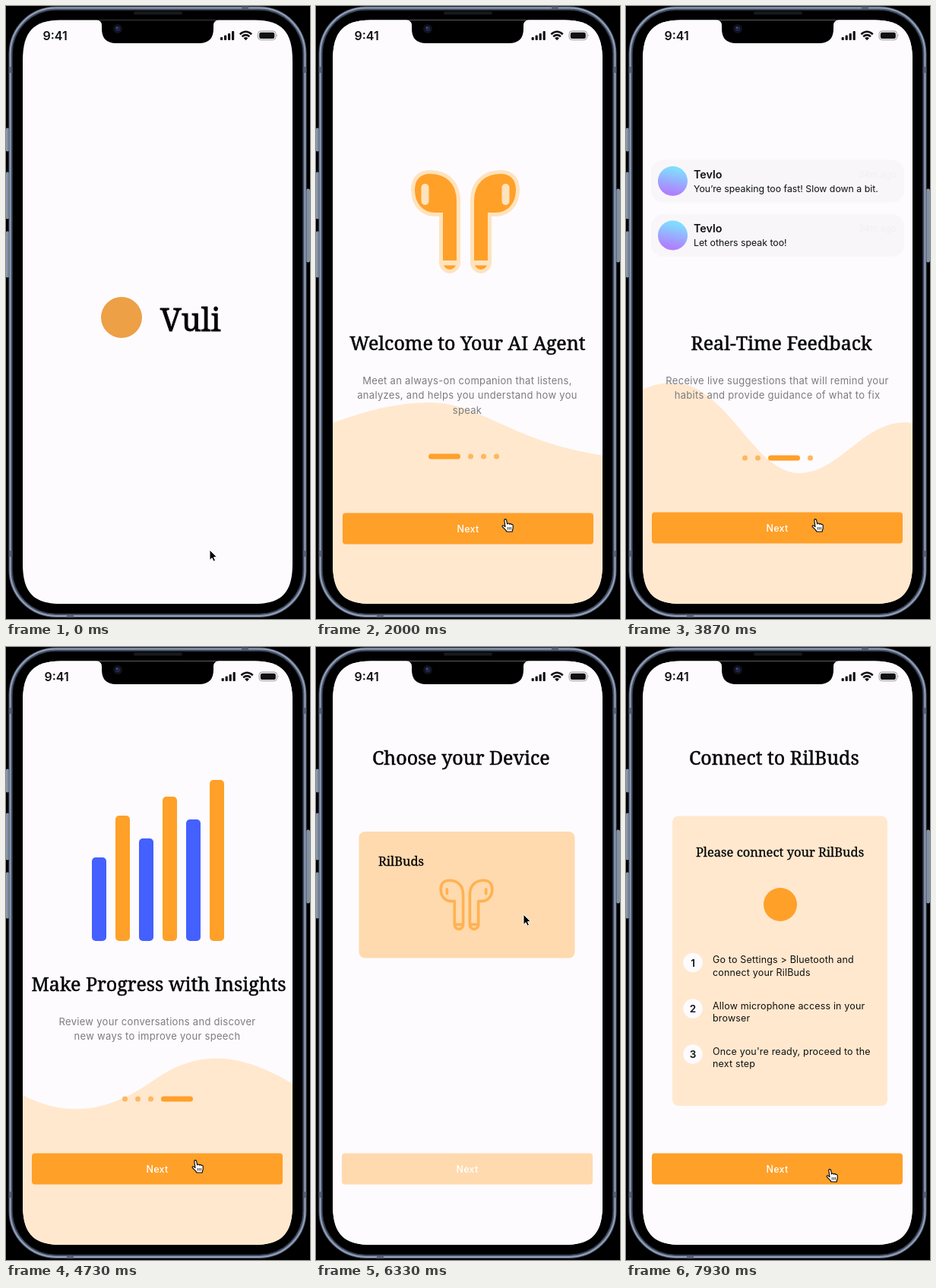
These frames come from a looping animation (400 by 807 pixels, 8 s). An HTML page:

```html
<!DOCTYPE html>
<html lang="en">
<head>
<meta charset="utf-8">
<title>Onboarding</title>
<style>
  html, body { margin: 0; width: 100%; height: 100%; overflow: hidden; background: #000; }
  svg { display: block; width: 100vw; height: 100vh; }
  text { font-family: Inter, sans-serif; fill: #111; }
  .serif { font-family: "Noto Serif", serif; fill: #050505; stroke: #050505; stroke-width: .02em; }
  .title { font-size: 25px; }
  .label { font-size: 16.5px; }
  .copy { font-size: 13px; letter-spacing: .3px; fill: #7d7b80; }
  .next { font-size: 12.5px; font-weight: 500; letter-spacing: .3px; fill: #fff; }
  .time { font-size: 16px; font-weight: 600; }
  .name { font-size: 14.3px; font-weight: 600; }
  .note { font-size: 12.3px; }
  .ago { font-size: 12px; fill: #f1eff2; }
  .step { font-size: 12.5px; letter-spacing: .17px; }
  .number { font-size: 13.5px; font-weight: 600; }
  .mid { text-anchor: middle; }
  .end { text-anchor: end; }
</style>
</head>
<body>
<svg id="stage" viewBox="0 0 400 807" preserveAspectRatio="none"></svg>
<script>
const LOOP = 8000, FADE = 300;
const ORANGE = '#ffa029', PALE = '#ffe8ce', PAPER = '#fdfbfe', BLUE = '#4460ff';

const rect = (x, y, w, h, r, fill, more = '') =>
  `<rect x="${x}" y="${y}" width="${w}" height="${h}" rx="${r}" fill="${fill}" ${more}/>`;
const circle = (x, y, r, fill) => `<circle cx="${x}" cy="${y}" r="${r}" fill="${fill}"/>`;
const text = (x, y, cls, words) => `<text x="${x}" y="${y}" class="${cls}">${words}</text>`;
const path = (d, fill, more = '') => `<path d="${d}" fill="${fill}" ${more}/>`;
const lines = (x, y, gap, cls, list) => list.map((s, i) => text(x, y + i * gap, cls, s)).join('');

function statusBar(dx) {
  const signal = [4, 6.5, 9, 12].map((h, i) => rect(282 + i * 5, 45 - h, 3.2, h, 1, '#111')).join('');
  const wifi = path('M307.8 37.2Q315.5 30.4 323.2 37.2M310.6 40.2Q315.5 36 320.4 40.2', 'none',
    'stroke="#111" stroke-width="2.5"') + path('M312.6 42.2Q315.5 39.8 318.4 42.2L315.5 45.2Z', '#111');
  const battery = rect(331.5, 33, 23.5, 11.6, 3.6, 'none', 'stroke="#999" stroke-width="1"') +
    rect(333.2, 34.7, 20.1, 8.2, 2.2, '#111') + path('M356.3 37v3.6q1.8-1.8 0-3.6', '#999');
  return text(48.5 + dx, 45, 'time', '9:41') + `<g transform="translate(${dx * .8})">${signal}${wifi}${battery}</g>`;
}

function nextButton(fill, shift = 0) {
  return rect(34 + shift, 666.5 + shift, 330, 41, 4, fill) +
    text(199 + shift, 691.5 + shift, 'next mid', 'Next');
}

function pageDots(active, x, y) {
  let out = '';
  for (let i = 0; i < 4; i++) {
    const w = i === active ? 42 : 7;
    out += rect(x, y - 3.5, w, 7, 3.5, i === active ? ORANGE : '#ffb75f');
    x += w + 10;
  }
  return out;
}

const wave = d => path(d + 'V790H22Z', PALE);

const BUD = 'M150 218.500C171 218.500 187.500 231 187.500 257V338C187.500 344 181.500 349.500 176 349.500' +
  'C170.500 349.500 164.500 344 164.500 338V274.500H157C139 274.500 127.500 261 127.500 242C127.500 228 135 218.500 150 218.500Z';
const mirrored = bud => bud + `<g transform="matrix(-1 0 0 1 393 0)">${bud}</g>`;

const solidBuds = () => mirrored(path(BUD, ORANGE, 'stroke="#ffe3bd" stroke-width="5"') +
  rect(138.5, 234, 10, 28, 5, '#ffe3bd') + rect(164, 335, 24, 6.5, 0, '#ffe3bd'));

const outlineBuds = color => mirrored(path(BUD + 'M165 337H187M144 242V254', 'none',
  `stroke="${color}" stroke-width="7.5" stroke-linecap="round" stroke-linejoin="round"`));

const LEVELS = [24, 16, 44, 18, 25, 24, 43, 34, 43, 34, 43, 49, 40, 47, 34];
const voice = (x, y, k) => LEVELS.map((h, i) =>
  rect(x + (i * 8.36 - 2) * k, y - h * k / 2, 4 * k, h * k, 2 * k, '#fff')).join('');
const bubble = (x, y, rx, ry, tail, fill) =>
  `<ellipse cx="${x}" cy="${y}" rx="${rx}" ry="${ry}" fill="${fill}"/>` + path(tail, fill);

const notice = (y, message) => rect(33, y, 333, 56, 16, '#f8f6f9') +
  circle(61.5, y + 28, 19.5, 'url(#avatar)') + text(89, y + 24, 'name', 'Tevlo') +
  text(356, y + 23, 'ago end', '34m ago') + text(89, y + 42, 'note', message);

const intro = (active, cx, title, copy, dotsX, dotsY, d, art) => wave(d) + art +
  text(cx, 453, 'serif title mid', title) + lines(199, 498, 19.3, 'copy mid', copy) +
  pageDots(active, dotsX, dotsY) + nextButton(ORANGE, active ? 0 : 1);

const deviceChoice = selected => text(74, 155, 'serif title', 'Choose your Device') +
  rect(56.5, 243, 284, 166.5, 8, selected ? ORANGE : PALE) +
  text(82, 288, 'serif label', 'RilBuds') +
  `<g transform="translate(101.7 200.2) scale(.49)">${outlineBuds(selected ? '#fff' : ORANGE)}</g>` +
  nextButton(selected ? ORANGE : PALE);

const chart = () => [110, 165, 135, 190, 160, 212].map((h, i) =>
  rect(113 + i * 31, 387 - h, 19, h, 5, i % 2 ? ORANGE : BLUE)).join('');

const instruction = (number, y, copy) => circle(88, y, 12.7, PAPER) +
  text(88, y + 5, 'number mid', number) + lines(114, y + .5, 16.5, 'step', copy);

const connect = () => text(83, 155, 'serif title', 'Connect to RilBuds') +
  rect(61, 222.5, 283, 381.5, 8, PALE) +
  text(202.5, 276, 'serif label mid', 'Please connect your RilBuds') +
  circle(203, 339, 22, ORANGE) +
  instruction(1, 415.5, ['Go to Settings &gt; Bluetooth and', 'connect your RilBuds']) +
  instruction(2, 476, ['Allow microphone access in your', 'browser']) +
  instruction(3, 536, ["Once you're ready, proceed to the", 'next step']) +
  nextButton(ORANGE);

// Each screen dissolves in over the one before it.
const screens = [
  [0, circle(152, 410, 27, '#eda045') + `<text x="203" y="428" class="serif" font-size="41">Vuli</text>`],
  [767, intro(0, 199.5, 'Welcome to Your AI Agent',
    ['Meet an always-on companion that listens,', 'analyzes, and helps you understand how you', 'speak'],
    148, 593, 'M22 549C70 531 110 522 150 522C216 522 258 574 377 591.5', solidBuds())],
  [2200, intro(1, 204.5, 'Track Speech Behavior',
    ['View how much you speak, what words you use', 'most, and how your style changes over time'],
    149.5, 595, 'M22 603C80 611 130 620 175 620C278 620 320 575 377 529',
    bubble(138.5, 226.5, 98.5, 43.5, 'M79 253L71 283L112 260Z', ORANGE) + voice(80, 226, 1) +
    bubble(289, 331.5, 73, 32, 'M314 358L339 373.5L333 350Z', BLUE) + voice(245, 331, .72))],
  [3250, intro(2, 204.5, 'Real-Time Feedback',
    ['Receive live suggestions that will remind your', 'habits and provide guidance of what to fix'],
    153, 595, 'M22 505C36 498 50 496 62 496C132 496 168 615 228 615C280 615 310 549 367 548L377 549',
    notice(202.5, 'You’re speaking too fast! Slow down a bit.') + notice(274, 'Let others speak too!'))],
  [4150, intro(3, 201, 'Make Progress with Insights',
    ['Review your conversations and discover', 'new ways to improve your speech'],
    153, 595, 'M22 590C90 625 145 605 195 570C255 528 310 535 377 575', chart())],
  [5000, deviceChoice(false)],
  [6294, deviceChoice(true)],
  [7100, connect()]
];

const sideButtons = [[0, 161, 30], [0, 219, 61], [0, 297, 60], [395.5, 241, 96]].map(([x, y, h]) =>
  rect(x, y, 4, h, 1.5, '#8290a5', 'stroke="#b9c5d6" stroke-width=".6"')).join('');

const antennas = [[3.5, 80, 5, 8], [390.5, 80, 5, 8], [3.5, 717, 5, 8], [390.5, 717, 5, 8], [310, 0, 9, 5], [80, 800.5, 9, 5]]
  .map(([x, y, w, h]) => rect(x, y, w, h, 0, '#465164', 'opacity=".7"')).join('');

const phoneBody = sideButtons +
  rect(3.5, .5, 392, 804.5, 62, '#4a566b') +
  rect(5.6, 2.6, 387.8, 800.3, 60, 'none', 'stroke="#93a1b8" stroke-width="2"') +
  rect(8.2, 5.2, 382.6, 795.1, 57.5, '#000', 'stroke="#364257" stroke-width="1"') +
  antennas + rect(168, 7, 64, 4.5, 2, '#17181b');

const notch = path('M119 18.5Q126 18.5 126 26V30Q126 49 145 49H254Q273 49 273 30V26Q273 18.5 280 18.5Z', '#000') +
  circle(147, 30, 6, '#10121c') + circle(147, 30, 3.2, '#20254a') + circle(146, 28.5, 1, '#545d91');

document.getElementById('stage').innerHTML = `
  <defs>
    <clipPath id="glass">${path('M22 72C22 34 36 18.5 72 18.5H327C363 18.5 377 34 377 72V734C377 772 363 787 327 787H72C36 787 22 772 22 734Z', '#fff')}</clipPath>
    <linearGradient id="avatar" x1=".6" y1="0" x2=".4" y2="1">
      <stop offset=".1" stop-color="#80dcff"/><stop offset=".9" stop-color="#b080ff"/>
    </linearGradient>
  </defs>
  ${phoneBody}
  <g clip-path="url(#glass)">${screens.map(([, art], i) =>
    `<g class="screen">${rect(20, 16, 360, 775, 0, PAPER)}${art}${statusBar(i ? 2 : 0)}</g>`).join('')}</g>
  ${notch}
  <g id="cursor">
    <g id="arrow">${path('M0 0V13.5L3.1 10.7L5.1 15.2L7.5 14.1L5.5 9.7H9.6Z', '#000', 'stroke="#fff" stroke-width="1"')}</g>
    <g id="hand">${path('M-1.2 1.2A1.4 1.4 0 0 1 1.6 .8L2.6 6C3 4.6 5.2 4.8 5.4 6.2C6 5.2 7.8 5.4 8 6.7C8.8 5.9 10.2 6.4 10.2 7.7V11C10.2 12.6 9.4 13.4 9.2 16H2C1 13.5 -1.5 12 -3.6 9.6C-4.6 8.2 -2.8 7.2 -1.8 8.2L0 9.6Z', '#fff', 'stroke="#000" stroke-width="1.1" stroke-linejoin="round"')}
      ${path('M3.2 10V13.5M5.3 10V13.5M7.4 10V13.5', 'none', 'stroke="#000" stroke-width=".8"')}</g>
  </g>`;

function play(el, frames) {
  const animation = el.animate(
    frames.map(([ms, props, easing = 'linear']) => ({ offset: ms / LOOP, easing, ...props })),
    { duration: LOOP, iterations: Infinity });
  animation.startTime = document.timeline.currentTime;
}

document.querySelectorAll('.screen').forEach((el, i) => {
  const start = screens[i][0];
  if (start) play(el, [
    [0, { opacity: 0 }], [start, { opacity: 0 }, 'ease-out'],
    [start + FADE, { opacity: 1 }], [LOOP, { opacity: 1 }]
  ]);
});

const at = (x, y) => ({ transform: `translate(${x}px, ${y}px)` });
play(document.getElementById('cursor'), [
  [0, at(268, 716)], [600, at(268, 716), 'ease-in-out'],
  [900, at(234, 551)], [1050, at(234, 552), 'ease-in-out'],
  [1550, at(249, 676)], [5000, at(249, 676)], [5050, at(248, 674)],
  [5500, at(248, 674), 'ease-in-out'], [6100, at(273, 352)],
  [6500, at(273, 352), 'ease-in-out'], [6950, at(268, 688)], [LOOP, at(268, 688)]
]);

const show = on => ({ opacity: on ? 1 : 0 });
const pointer = hand => [[0, 0], [1450, 1], [5060, 0], [6900, 1], [LOOP, 1]]
  .map(([ms, onButton]) => [ms, show(onButton === hand), 'steps(1)']);
play(document.getElementById('arrow'), pointer(0));
play(document.getElementById('hand'), pointer(1));
</script>
</body>
</html>
```
